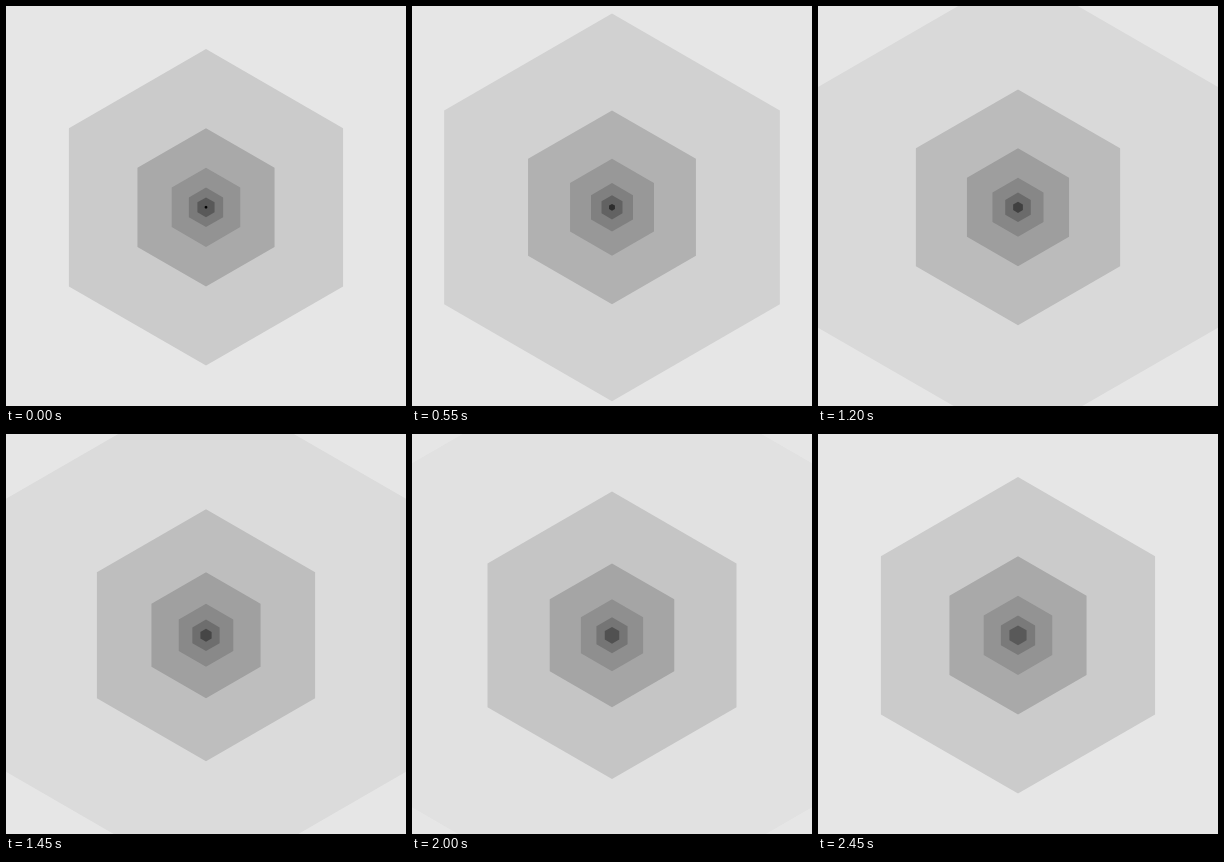
These frames come from a looping animation (400x400 px, 2.5 s). An HTML page:

```html
<!DOCTYPE html>
<html lang="en">
<head>
<meta charset="utf-8">
<title>Hexagon zoom</title>
<style>
  html, body { margin: 0; width: 100%; height: 100%; overflow: hidden; background: #e6e6e6; }
  svg { display: block; width: 400px; height: 400px; }
</style>
</head>
<body>
<svg viewBox="0 0 400 400"></svg>
<script>
const STEP = 50, STEPS = 50, GAMMA = 2.2;
const CX = 200, CY = 201.3, RADIUS = 158.3, DOT = 1.5;
// Greys from the backdrop inwards; each ring fades to its outer neighbour.
const GREYS = [230, 203, 169, 147, 122, 89, 0];

const svg = document.querySelector('svg');
const rings = GREYS.slice(1).map(() =>
  svg.appendChild(document.createElementNS('http://www.w3.org/2000/svg', 'polygon')));

const lerp = (a, b, p) => a + (b - a) * p;

// Mix two greys in linear light.
const mix = (a, b, p) =>
  Math.round(lerp(a ** GAMMA, b ** GAMMA, p) ** (1 / GAMMA));

function hexagon(r) {
  return Array.from({ length: 6 }, (_, i) => {
    const a = (i * 60 - 90) * Math.PI / 180;
    return (CX + r * Math.cos(a)).toFixed(3) + ',' + (CY + r * Math.sin(a)).toFixed(3);
  }).join(' ');
}

function draw(p) {
  rings.forEach((ring, i) => {
    const size = RADIUS / 2 ** i;
    const from = i === rings.length - 1 ? DOT : size;
    const g = mix(GREYS[i + 1], GREYS[i], p);
    ring.setAttribute('points', hexagon(lerp(from, size * 2, p)));
    ring.setAttribute('fill', `rgb(${g},${g},${g})`);
  });
}

const start = performance.now();
function tick() {
  const step = Math.floor((performance.now() - start) / STEP) % STEPS;
  draw(step / (STEPS - 1));
  requestAnimationFrame(tick);
}
tick();
</script>
</body>
</html>
```
